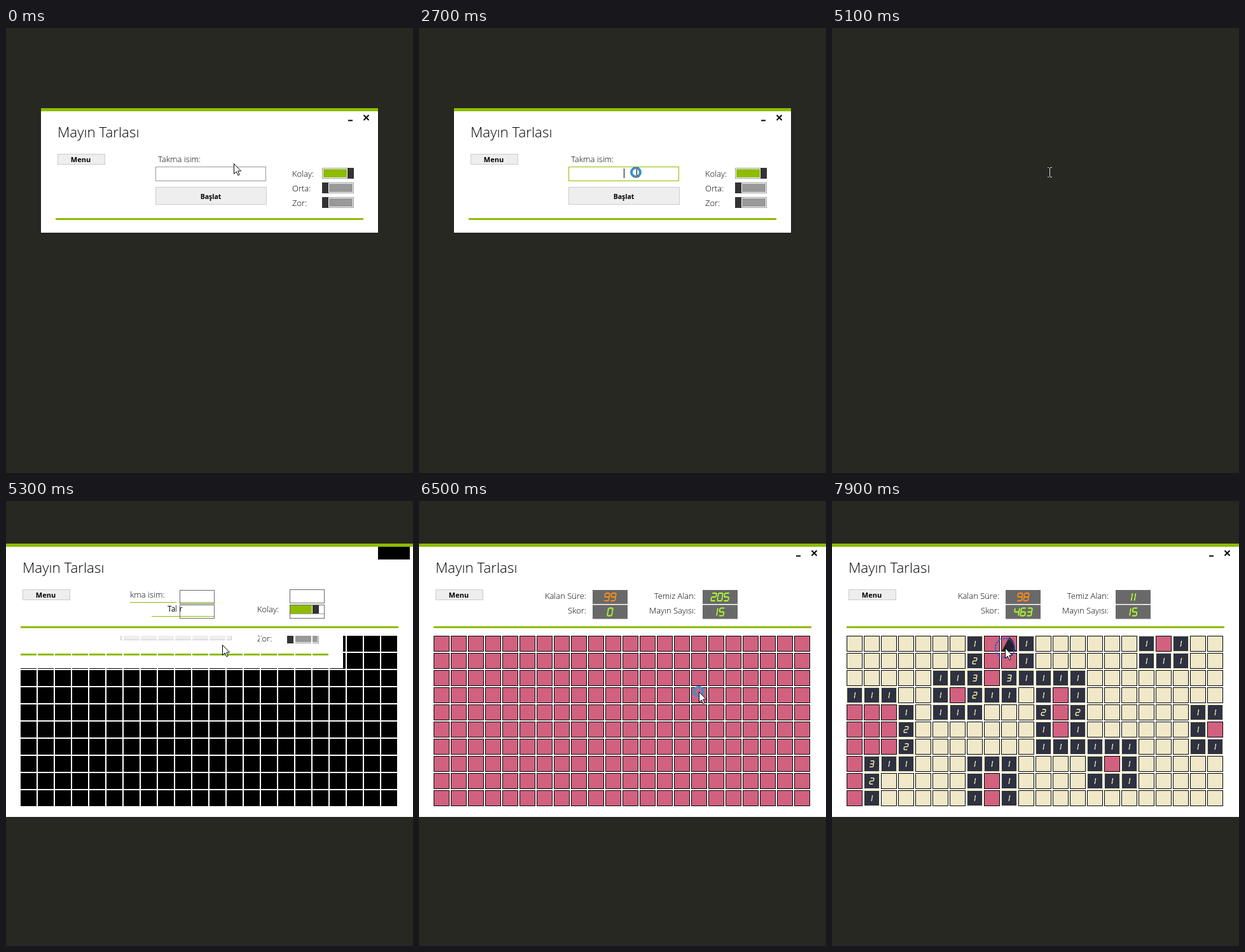
An HTML page for the animation above (8 s loop, 640x700 px).

```html
<!DOCTYPE html>
<html lang="tr">
<head>
<meta charset="utf-8">
<title>Mayın Tarlası</title>
<style>
  html, body { margin: 0; width: 100%; height: 100%; overflow: hidden; background: #272822; }
  svg { display: block; width: 640px; height: 700px; }
  text { font: 300 13px "Open Sans", "Noto Sans", sans-serif; fill: #000; }
  .title { font-size: 22.4px; }
  .bold { font-weight: 700; font-size: 11px; text-anchor: middle; }
  .small { font-size: 10.5px; }
  .end { text-anchor: end; }
  .typed { font-weight: 400; font-size: 12px; }
  .mid { text-anchor: middle; }
  .line { fill: none; stroke-width: 1.7; }
  .led { fill: none; stroke-width: 1.8; stroke-linecap: round; }
  #beam { mix-blend-mode: difference; }
</style>
</head>
<body>
<svg id="stage" viewBox="0 0 640 700"></svg>
<script>
const LOOP = 8000, STEP = 100;
const GREEN = '#8ebc00', PINK = '#d1617f', NAME = 'Talir';
const COLS = 22, ROWS = 10, PITCH = 27, LEFT = 23, TOP = 212;
const BOARD = [
  '.......1##1......1#1..',
  '.......2##1......111..',
  '.....113#31111........',
  '111..1#211.1#1........',
  '###1.111...2#2......11',
  '###2.......1#1......1#',
  '###2.......111111...11',
  '#311...111....1#1.....',
  '#2.....1#1....111.....',
  '#1.....1#1............'
];

// Drawing helpers
const rect = (x, y, w, h, fill) =>
  `<rect x="${x}" y="${y}" width="${w}" height="${h}" fill="${fill}"/>`;
const box = (x, y, w, h, fill, stroke, id = '') =>
  `<rect id="${id}" x="${x + .5}" y="${y + .5}" width="${w - 1}" height="${h - 1}" fill="${fill}" stroke="${stroke}"/>`;
const text = (x, y, s, cls = '') => `<text x="${x}" y="${y}" class="${cls}">${s}</text>`;
const group = (id, body, attrs = '') => `<g id="${id}" ${attrs}>${body}</g>`;

// Seven-segment digits on a 7 by 12 field
const SEGMENTS = ['M1 0H6', 'M7 1V5', 'M7 7V11', 'M1 12H6', 'M0 7V11', 'M0 1V5', 'M1 6H6'];
const LIT = ['012345', '12', '01346', '01236', '1256', '02356', '023456', '012', '0123456', '012356'];
const advance = c => c === '1' ? 5 : c === ':' ? 4 : 10;

function led(s, cx, cy, color, scale = 1) {
  const chars = [...s];
  let x = -(chars.reduce((sum, c) => sum + advance(c), 0) - 3) / 2;
  const body = chars.map(c => {
    const d = c === ':' ? 'M0 4V4.5M0 8V8.5' : [...LIT[c]].map(i => SEGMENTS[i]).join('');
    const at = c === '1' ? x - 5.5 : x;
    x += advance(c);
    return `<path d="${d}" transform="translate(${at} -6)"/>`;
  }).join('');
  return `<g class="led" stroke="${color}" transform="translate(${cx} ${cy}) scale(${scale}) skewX(-9)">${body}</g>`;
}

function eachCell(draw) {
  let out = '';
  for (let r = 0; r < ROWS; r++)
    for (let c = 0; c < COLS; c++)
      out += draw(LEFT + c * PITCH, TOP + r * PITCH, BOARD[r][c]);
  return out;
}

function openCell(x, y, kind) {
  if (kind === '#') return box(x, y, 25, 25, PINK, '#000');
  if (kind === '.') return box(x, y, 25, 25, '#f0e8c8', '#000');
  return box(x, y, 25, 25, '#2e3142', '#eee8aa') +
    led(kind, x + 12.5, y + 12.5, '#f6f0a4', .8);
}

const toggle = (x, y, on) => box(x, y, 50, 17, '#fff', '#999') +
  rect(x + (on ? 2 : 11), y + 2, 37, 13, on ? GREEN : '#999') +
  rect(x + (on ? 40 : 0), y, 10, 17, '#333');

const header = (x, y) => rect(x, y, 640, 5, GREEN) +
  text(x + 26, y + 46, 'Mayın Tarlası', 'title') +
  box(x + 26, y + 72, 75, 17, '#eee', '#ccc') +
  text(x + 62.5, y + 85, 'Menu', 'bold');

const controls = (x, y) => `<path d="M${x} ${y + 8}h7M${x + 24.5} ${y - .5}l8 8m0 -8l-8 8" ` +
  'fill="none" stroke="#000" stroke-width="2"/>';

const login = `<clipPath id="frame"><rect x="55" y="126" width="530" height="196"/></clipPath>` +
  box(54, 125, 532, 198, '#fff', '#1f201b') +
  `<g clip-path="url(#frame)">${header(55, 126)}</g>` +
  controls(538, 137.5) +
  rect(78, 299, 484, 3, GREEN) +
  text(239, 211, 'Takma isim:') +
  box(235, 218, 174, 23, '#fff', '#999', 'field') +
  box(235, 250, 175, 28, '#eee', '#ccc') +
  text(322, 269, 'Başlat', 'bold small') +
  ['Kolay:', 'Orta:', 'Zor:'].map((s, i) =>
    text(450, 234 + 23 * i, s) + toggle(497, 220 + 23 * i, i === 0)).join('') +
  '<text id="typed" class="typed mid" x="322" y="232"></text>' +
  group('caret', rect(0, 221, 1, 15, '#000'));

// Half-painted window: leftovers of the login form over blank cells
const gaps = Array.from({ length: 20 }, (_, c) => rect(LEFT - 2 + c * PITCH, 212, 2, 51, '#fff')).join('');
const partial = rect(585, 72, 50, 20, '#000') +
  [[273, 140], [273, 163], [446, 139], [446, 163]].map(([x, y]) => box(x, y, 55, 22, '#fff', '#696969')).join('') +
  text(195, 152, 'kma isim:') +
  rect(195, 159, 73, 1, GREEN) + rect(274, 159, 53, 1, GREEN) +
  rect(229, 181, 44, 1, GREEN) + rect(274, 181, 53, 1, GREEN) +
  text(254, 174, NAME, 'typed') + rect(268, 162, 4, 15, '#fff') +
  text(395, 175, 'Kolay:') +
  rect(447, 164, 34, 13, GREEN) + rect(482, 164, 10, 14, '#333') + rect(447, 177, 53, 1, '#999') +
  eachCell((x, y) => rect(x, y, 25, 25, '#000')) +
  rect(0, 212, 530, 51, '#fff') +
  box(180, 206, 175, 13, '#eee', '#ccc') + rect(180, 205, 175, 7, '#fff') +
  text(395, 221, 'Zor:') + rect(395, 205, 30, 7, '#fff') +
  box(442, 206, 50, 18, '#fff', '#999') + rect(442, 205, 50, 7, '#fff') +
  rect(442, 212, 10, 12, '#333') + rect(455, 212, 35, 10, '#999') +
  rect(23, 240, 484, 3, GREEN) + gaps;

const LED_AT = [[300.5, 151], [300.5, 174.5], [473.5, 151], [473.5, 174.5]];
const panel = controls(593, 78.5) +
  text(263, 154, 'Kalan Süre:', 'end') + text(263, 177, 'Skor:', 'end') +
  text(435, 154, 'Temiz Alan:', 'end') + text(435, 177, 'Mayın Sayısı:', 'end') +
  LED_AT.map(([x, y]) => rect(x - 27.5, y - 11, 55, 22, '#696969')).join('') +
  group('leds', '') +
  group('closed', eachCell((x, y) => box(x, y, 25, 25, PINK, '#000'))) +
  group('opened', eachCell(openCell)) +
  group('hover', box(347, 320, 25, 25, '#b9566f', '#000')) +
  group('mine', '<path d="M275 221L279 214L285 220L289 236H267Z" fill="#25212d"/>');

const stage = document.getElementById('stage');
stage.innerHTML = rect(0, 0, 640, 700, '#272822') +
  group('login', login) +
  group('game', rect(0, 67, 640, 430, '#fff') + header(0, 67) + rect(23, 197, 594, 3, GREEN) +
    group('partial', partial) + group('panel', panel)) +
  '<circle id="ring" fill="none"/>' +
  group('beam', '<path d="M-3 -7.5H-1M1 -7.5H4M.5 -7V7M-3 7.5H-1M1 7.5H4" fill="none" stroke="#fff"/>') +
  group('arrow', '<path d="M.5 .5V16.5L4.2 13L6.8 18.8L9.2 17.7L6.7 12H11.5Z" fill="#fff" stroke="#000"/>');

const $ = id => document.getElementById(id);
const show = (id, on) => $(id).setAttribute('display', on ? 'inline' : 'none');

const PATH = [
  [0, 358, 213], [300, 545, 142], [500, 530, 245], [900, 342, 227], [5200, 342, 227],
  [5300, 340, 226], [5500, 340, 226], [6100, 378, 217], [6500, 440, 300], [6700, 440, 300],
  [7000, 339, 331], [7200, 430, 408], [7400, 535, 290], [7600, 200, 305], [7800, 272, 231], [8000, 272, 231]
];
const CLICKS = [[2700, 341, 227], [6500, 440, 300], [7700, 272, 231]];
const KEYS = [3900, 4000, 4200, 4300, 4400];

function pointer(t) {
  const i = PATH.findIndex(p => p[0] > t);
  const [t0, x0, y0] = PATH[i - 1], [t1, x1, y1] = PATH[i];
  const k = (t - t0) / (t1 - t0);
  return [Math.round(x0 + (x1 - x0) * k), Math.round(y0 + (y1 - y0) * k)];
}

function readings(t) {
  if (t < 6500) return ['00:00', '9999', '9999', '15'];
  if (t < 7100) return ['99', '0', '205', '15'];
  return [t < 7400 ? '99' : '98', '463', '11', '15'];
}

function drawLogin(t) {
  const fade = Math.max(0, (t - 4800) / 300), scale = 1 - .08 * fade;
  show('login', t < 5100);
  $('login').setAttribute('opacity', 1 - fade);
  $('login').setAttribute('transform', `translate(320 224) scale(${scale}) translate(-320 -224)`);
  $('field').setAttribute('stroke', t < 2700 ? '#999' : GREEN);
  $('typed').textContent = NAME.slice(0, KEYS.filter(k => k <= t).length);
  show('caret', t >= 2700);
  const half = $('typed').textContent ? $('typed').getComputedTextLength() / 2 : 0;
  $('caret').setAttribute('transform', `translate(${Math.round(322 + half)} 0)`);
}

function drawGame(t) {
  show('game', t >= 5300);
  show('partial', t < 5400);
  show('panel', t >= 5400);
  show('closed', t < 6800);
  show('opened', t >= 6800);
  show('hover', t >= 6900 && t < 7100);
  show('mine', t >= 7800);
  $('leds').innerHTML = readings(t).map((s, i) =>
    led(s, ...LED_AT[i], i ? '#adff2f' : '#ff8c1a')).join('');
}

function drawPointer(t) {
  const [x, y] = pointer(t);
  const beam = t >= 800 && t < 5300;
  show('beam', beam);
  show('arrow', !beam);
  $(beam ? 'beam' : 'arrow').setAttribute('transform', `translate(${x} ${y})`);

  const click = CLICKS.find(([at]) => t >= at && t < at + 700);
  show('ring', click);
  if (!click) return;
  const [at, cx, cy] = click, age = t - at, ring = $('ring');
  const attrs = {
    cx, cy, r: 7 + age * .04,
    stroke: age < 100 ? '#3f8fc8' : '#2d56c8',
    'stroke-width': Math.max(1.5, 4 - age / 120),
    'stroke-dasharray': age < 100 ? 'none' : '3 1.5',
    opacity: Math.min(1, 1.2 - age / 650)
  };
  for (const key in attrs) ring.setAttribute(key, attrs[key]);
}

const start = performance.now();
let last = -1;
function tick(now) {
  const t = Math.floor(Math.max(0, now - start) % LOOP / STEP) * STEP;
  if (t !== last) {
    last = t;
    drawLogin(t);
    drawGame(t);
    drawPointer(t);
  }
  requestAnimationFrame(tick);
}
tick(start);
</script>
</body>
</html>
```
